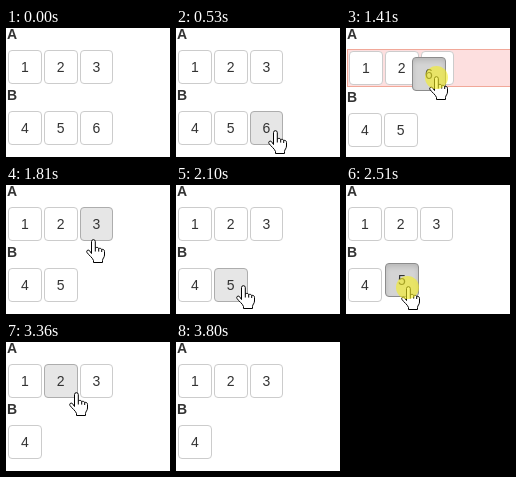
An HTML page for the animation above (4.58 s loop, 164 by 129 pixels).

```html
<!DOCTYPE html>
<html lang="en">
<meta charset="utf-8">
<title>Drag and drop between two lists</title>
<style>
html, body { margin: 0; width: 100%; height: 100%; overflow: hidden; background: #fff; }
body { position: relative; font: 14px/20px "Liberation Sans", Arial, sans-serif; color: #333; }
body * { position: absolute; box-sizing: border-box; }
.label { left: 1px; font-weight: bold; }
.zone { left: 1px; top: 21px; width: 170px; height: 38px; border: 1px solid #f1a899; background: #fddfdf; }
.tile { width: 33.8px; height: 34px; padding: 6px 0; text-align: center;
  border: 1px solid #ccc; border-radius: 4px; background: #fff; }
.hover { background: #e6e6e6; border-color: #adadad; }
.dragged { background: #d4d4d4; border-color: #8c8c8c; box-shadow: inset 0 3px 5px rgba(0,0,0,.125); z-index: 1; }
svg { width: 20px; height: 25px; overflow: visible; z-index: 2; }
path { fill: #fff; stroke: #000; stroke-linejoin: round; }
.press { width: 23px; height: 23px; border-radius: 50%; background: rgba(245,238,30,.6); z-index: 3; }
</style>
<body>
<div class="label" style="top:-4px">A</div>
<div class="label" id="labelB">B</div>
<div class="zone"></div>
<svg viewBox="0 0 20 25">
  <path d="M5.5 14.5V2.6a1.9 1.9 0 0 1 3.8 0V9c1.2-1 3-.8 3.4.6c1.2-.6 2.6-.2 3 .9c1.4-.5 2.8.2 2.8 2V16c0 2.5-2 3.5-2 5.5v2H7.5v-2C6.5 18.5 3 16.5 1 13.5c-1-1.6.8-3.2 2.4-2z"/>
  <path d="M9.3 9v3.5M12.7 9.6v3M15.7 10.5v2.5"/>
</svg>
<div class="press"></div>
<script>
const LOOP = 4580, STEP = 81, SIZE = 34, ZONE_BOTTOM = 59;

const easeIn = u => u * u;
const easeOut = u => u * (2 - u);

// Strokes of the hand, each running on from the place where the last one ended.
const strokes = [
  { start: 320, end: 530, x: 91.5, y: 102, ease: easeOut },
  { start: 780, end: 1100, x: 84, y: 71, ease: easeIn },
  { start: 1180, end: 1410, x: 83, y: 48, ease: easeOut },
  { start: 1720, end: 2100, x: 60, y: 100, ease: easeIn },
  { start: 2180, end: 2250, x: 54, y: 107, ease: easeOut },
  { start: 2420, end: 2800, x: 59, y: 55, ease: easeIn },
  { start: 2880, end: 3030, x: 62, y: 48, ease: easeOut },
  { start: 3360, end: 3800, x: 86, y: 135, ease: easeIn }
];

// A dragged tile keeps its offset (dx, dy) to the hand and vanishes on drop.
const drags = {
  6: { start: 780, end: 1720, dx: 17, dy: 19 },
  5: { start: 2420, end: 3360, dx: 16, dy: 23 }
};

const [zone, press, hand, labelB] =
  ['.zone', '.press', 'svg', '#labelB'].map(s => document.querySelector(s));

const place = (el, x, y) => { el.style.left = x + 'px'; el.style.top = y + 'px'; };
const show = (el, visible) => { el.style.display = visible ? '' : 'none'; };

const tiles = [1, 2, 3, 4, 5, 6].map((label, i) => {
  const el = document.createElement('div');
  el.textContent = label;
  document.body.append(el);
  return { el, column: i % 3, inA: i < 3, drag: drags[label] };
});

// The hand moves in even steps, the first one at the start of each stroke.
function handAt(t) {
  if (t < strokes[0].start) return { x: 200, y: 200 };
  let pos = { x: 138, y: 127 };
  for (const { start, end, x, y, ease } of strokes) {
    if (t < start) break;
    const gaps = Math.round((end - start) / STEP);
    const passed = Math.floor(Math.min(1, (t - start) / (end - start)) * gaps);
    const k = ease((passed + 1) / (gaps + 1));
    pos = { x: pos.x + (x - pos.x) * k, y: pos.y + (y - pos.y) * k };
  }
  return pos;
}

function render(t) {
  const { x, y } = handAt(t);
  const tipX = x + 7.5, tipY = y + 1;
  const active = Object.values(drags).find(d => t >= d.start && t < d.end);
  const overZone = !!active && y - active.dy + SIZE / 2 < ZONE_BOTTOM;
  const border = overZone ? 1 : 0;

  for (const { el, column, inA, drag } of tiles) {
    const dragged = !!active && drag === active;
    const left = dragged ? Math.round(x - drag.dx) : 2 + column * 35.8 + (inA ? border : 0);
    const top = dragged ? Math.round(y - drag.dy) : inA ? 22 + border : 83 + 2 * border;
    const hover = !active && tipX >= left && tipX < left + SIZE && tipY >= top && tipY < top + SIZE;
    el.className = 'tile' + (dragged ? ' dragged' : hover ? ' hover' : '');
    place(el, left, top);
    show(el, !drag || t < drag.end);
  }

  place(labelB, 1, 57 + 2 * border);
  show(zone, overZone);
  show(press, active);
  place(press, tipX - 12, tipY - 11.5);
  place(hand, x, y);
}

const began = performance.now();
function tick() {
  render((performance.now() - began) % LOOP);
  requestAnimationFrame(tick);
}
tick();
</script>
</body>
</html>
```
